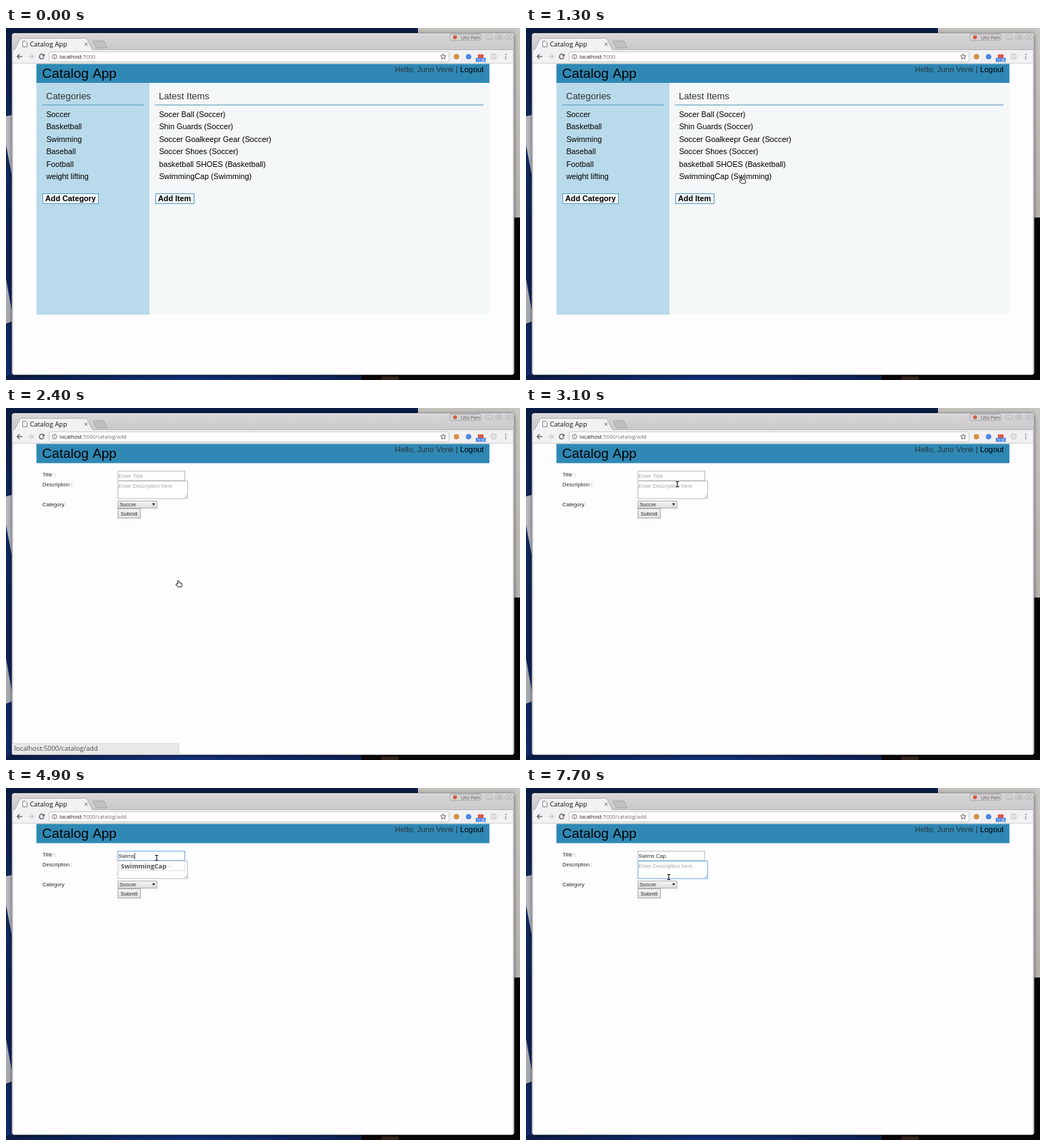
Recreate the animation shown at these times as an HTML page with a canvas. Size 720 by 494 pixels, loop 8000 ms.

```html
<!DOCTYPE html>
<html lang="en">
<head>
<meta charset="utf-8">
<title>Catalog App</title>
<style>
  html, body { margin: 0; width: 100%; height: 100%; overflow: hidden; background: #0c2558; }
  canvas { display: block; width: 720px; height: 494px; }
</style>
</head>
<body>
<canvas id="stage"></canvas>
<script>
const LOOP = 8000, STEP = 100;
const PAGE_FONT = '"Liberation Sans", Arial, sans-serif';
const UI_FONT = '"Open Sans", "Noto Sans", sans-serif';
const canvas = document.getElementById('stage');
const ratio = window.devicePixelRatio || 1;
canvas.width = 720 * ratio;
canvas.height = 494 * ratio;
const ctx = canvas.getContext('2d');
ctx.scale(ratio, ratio);

// ---------- helpers ----------
function rect(x, y, w, h, fill, border) {
  if (fill) { ctx.fillStyle = fill; ctx.fillRect(x, y, w, h); }
  if (border) {
    ctx.strokeStyle = border;
    ctx.lineWidth = 1;
    ctx.strokeRect(x + .5, y + .5, w - 1, h - 1);
  }
}
function roundRect(x, y, w, h, r, fill, border) {
  ctx.beginPath();
  ctx.roundRect(x + .5, y + .5, w - 1, h - 1, r);
  ctx.fillStyle = fill;
  ctx.fill();
  if (border) { ctx.strokeStyle = border; ctx.lineWidth = 1; ctx.stroke(); }
}
function poly(points, fill, stroke, width = 1, close = true) {
  ctx.beginPath();
  points.forEach(([x, y]) => ctx.lineTo(x, y));
  if (close) ctx.closePath();
  if (fill) { ctx.fillStyle = fill; ctx.fill(); }
  if (stroke) { ctx.strokeStyle = stroke; ctx.lineWidth = width; ctx.stroke(); }
}
const line = (x1, y1, x2, y2, color, width = 1) =>
  poly([[x1, y1], [x2, y2]], null, color, width, false);
function circle(x, y, r, fill, stroke, width = 1) {
  ctx.beginPath();
  ctx.arc(x, y, r, 0, 7);
  if (fill) { ctx.fillStyle = fill; ctx.fill(); }
  if (stroke) { ctx.strokeStyle = stroke; ctx.lineWidth = width; ctx.stroke(); }
}
function text(str, x, y, size, color = '#000', { font = PAGE_FONT, weight = 400, align = 'left' } = {}) {
  ctx.font = `${weight} ${size}px ${font}`;
  ctx.textAlign = align;
  ctx.fillStyle = color;
  ctx.fillText(str, x, y);
  return ctx.measureText(str).width;
}
function gradient(x1, y1, x2, y2, ...colors) {
  const g = ctx.createLinearGradient(x1, y1, x2, y2);
  colors.forEach((c, i) => g.addColorStop(i / (colors.length - 1), c));
  return g;
}
function faded(alpha, draw) {
  if (alpha <= 0) return;
  ctx.save();
  ctx.globalAlpha = Math.min(alpha, 1);
  draw();
  ctx.restore();
}
const between = (t, from, to) => t >= from && t < to;

// ---------- desktop and browser ----------
function drawDesktop() {
  rect(0, 0, 720, 494, gradient(0, 0, 0, 494, '#0b1c44', '#10295f', '#0d2050', '#102a6c'));
  poly([[0, 124], [8, 122], [8, 206], [0, 164]], '#b4b7bc');
  poly([[0, 352], [8, 396], [8, 412], [0, 415]], '#a5a9b0');
  rect(0, 487, 500, 7, gradient(0, 0, 500, 0, '#0c1d48', '#12327c', '#0e2253'));
  rect(577, 0, 143, 8, '#c3c1bd');
  rect(711, 0, 9, 268, gradient(0, 0, 0, 268, '#c8c6c2', '#b4b1ac'));
  rect(711, 266, 9, 228, '#050506');
  rect(498, 487, 222, 7, '#0a0808');
  rect(526, 489, 24, 5, '#33221d');
}

function drawWindow() {
  ctx.save();
  ctx.shadowColor = 'rgba(0,0,0,.65)';
  ctx.shadowBlur = 5;
  ctx.shadowOffsetY = 1;
  roundRect(8, 7, 704, 480, 3, '#d4d4d4');
  ctx.restore();
  roundRect(8, 7, 704, 480, 3, gradient(0, 7, 0, 31, '#d8d6d8', '#cac8cb'), '#b0afb0');
  line(10, 8.5, 710, 8.5, '#e9e7e9');

  roundRect(621, 8, 45, 10, 2, '#d3d1d3', '#adabad');
  circle(629, 13, 2.7, '#cf5a40');
  text('Ulo Fen', 637, 16, 7.6, '#555', { font: UI_FONT });
  for (const x of [671, 685, 699]) roundRect(x, 9, 11, 8, 2, '#d2d0d2', '#bab8ba');
  line(674, 14.5, 679, 14.5, '#b4b2b4');
  rect(688, 11, 5, 4, null, '#b4b2b4');
  line(702, 11, 707, 15, '#b4b2b4');
  line(707, 11, 702, 15, '#b4b2b4');

  poly([[122, 18], [137, 18], [142, 28], [127, 28]], '#c1bfc1', '#aaa8aa');
  rect(10, 30, 700, 20, '#f1f0f2');
  line(10, 30.5, 710, 30.5, '#b8b6b8');
  poly([[10, 31], [13, 29], [19, 16], [21, 14.5], [112, 14.5], [114, 16], [120, 29], [123, 31]],
    '#f2f0f2', '#b3b1b3', 1, false);
  rect(10, 31, 114, 2, '#f2f0f2');
  rect(10, 50, 700, 436, '#fdfcfe');
  line(10, 49.5, 710, 49.5, '#d4d3d5');
}

function drawReload(x, y) {
  ctx.beginPath();
  ctx.arc(x, y, 3.2, .3, 5.4);
  ctx.strokeStyle = '#555';
  ctx.lineWidth = 1.2;
  ctx.stroke();
  poly([[x + 4, y - 4], [x + 4, y - .3], [x + .4, y - .3]], '#555');
}

function drawArrow(x, y, dir, color) {
  line(x - 3.5, y, x + 3.5, y, color, 1.2);
  poly([[x + dir * .5, y - 3.3], [x + dir * 3.8, y], [x + dir * .5, y + 3.3]], null, color, 1.2, false);
}

function drawToolbar(t) {
  const ui = { font: UI_FONT };
  const committing = between(t, 2300, 2400);
  if (committing) {
    line(25, 19.5, 28, 19.5, '#bbb');
    text('localhost:5000/c', 33.5, 25.5, 9.3, gradient(33, 0, 105, 0, '#222', '#222', '#222', '#f2f2f2'), ui);
  } else {
    poly([[23.5, 18.5], [27, 18.5], [29.5, 21], [29.5, 26.5], [23.5, 26.5]], '#fff', '#777', .9);
    text('Catalog App', 33.5, 25.5, 9.3, '#111', ui);
  }
  line(110, 20.5, 114.3, 24.8, '#666');
  line(114.3, 20.5, 110, 24.8, '#666');

  drawArrow(19.5, 40, -1, '#555');
  drawArrow(34.5, 40, 1, '#c4c4c4');
  if (between(t, 2100, 2400)) {
    line(46.7, 36.8, 53.1, 43.2, '#555', 1.2);
    line(53.1, 36.8, 46.7, 43.2, '#555', 1.2);
  } else drawReload(50, 40);

  roundRect(60, 33, 561, 15, 2, '#fff', '#cac9ca');
  circle(68, 40.2, 3.2, null, '#666', .9);
  line(68, 39.7, 68, 42, '#666', .9);
  rect(67.5, 38, 1, 1, '#666');
  const hostWidth = text('localhost', 75, 42.8, 7.45, '#111', ui);
  text(t < 2300 ? ':5000' : ':5000/catalog/add', 75 + hostWidth, 42.8, 7.45, '#6c6c6c', ui);

  const star = Array.from({ length: 10 }, (_, i) => {
    const a = i * Math.PI / 5 - Math.PI / 2, r = i % 2 ? 1.8 : 4;
    return [612.5 + r * Math.cos(a), 40.3 + r * Math.sin(a)];
  });
  poly(star, null, '#555', .9);
  circle(631, 40.3, 3.8, '#d68f45');
  circle(648, 40.3, 3.8, '#4a86e2');
  rect(661, 37, 8, 5, '#d9594d');
  rect(658, 42, 14, 5.5, '#4a84e8');
  text('+13K', 665, 46.6, 5, '#fff', { font: UI_FONT, align: 'center' });
  roundRect(679, 36, 8, 8, 1, '#e2e2e2', '#c6c6c6');
  for (const y of [37.3, 40.2, 43.1]) circle(700, y, .8, '#555');
}

// ---------- web page ----------
function drawHeader() {
  rect(42.6, 50.4, 634.6, 27, '#2f88b4');
  text('Catalog App', 50.6, 70.2, 18.95);
  text('Logout', 669.2, 62, 10.85, '#000', { align: 'right' });
  text('Hello, Juno Venk | ', 635.8, 62, 10.95, '#2b3438', { align: 'right' });
}

function linkButton(label, x, w, hover) {
  rect(x, 232, w, 15, hover ? '#e4eef5' : '#f1f5f8', '#5b9fca');
  const color = hover ? '#2b4763' : '#000';
  const width = text(label, x + 4, 243.4, 10.8, color, { weight: 700 });
  if (hover) line(x + 4, 245, x + 4 + width, 245, color);
}

function drawCatalog(t) {
  rect(42.6, 77, 158.4, 325.4, '#b9daeb');
  rect(201, 77, 476.2, 325.4, '#f3f7f8');
  const column = (title, x, lineEnd, items) => {
    text(title, x + 5, 99.6, 13, '#333');
    line(x, 108, lineEnd, 108, '#4e93b9');
    items.forEach((item, i) => text(item, x + 5.4, 125 + i * 17.4, 10.8));
  };
  column('Categories', 51, 193,
    ['Soccer', 'Basketball', 'Swimming', 'Baseball', 'Football', 'weight lifting']);
  column('Latest Items', 209, 669,
    ['Socer Ball (Soccer)', 'Shin Guards (Soccer)', 'Soccer Goalkeepr Gear (Soccer)',
     'Soccer Shoes (Soccer)', 'basketball SHOES (Basketball)', 'SwimmingCap (Swimming)']);
  linkButton('Add Category', 51, 79, false);
  linkButton('Add Item', 209, 55, t >= 1600);
}

const KEYSTROKES = [[3900, 'S'], [4000, 'w'], [4200, 'i'], [4400, 'm'], [4900, 's'],
  [5100, ' '], [5300, 'C'], [5500, 'a'], [5600, 'p']];
const SUGGESTIONS = ['sdfxf', 'Sdf', 'Second Post', 'second post', 'Second post', 'Second Post!'];
const TITLE_FOCUS = 3400, BODY_FOCUS = 5800;

function caret(x, y, t, since) {
  if ((t - since) % 1000 < 500) rect(x, y, .8, 9, '#222');
}

function drawForm(t) {
  const label = (str, x, y, color = '#2c2c2c') => text(str, x, y, 7.6, color);
  const typed = KEYSTROKES.filter(([at]) => t >= at);
  const title = typed.map(([, key]) => key).join('');
  const inTitle = between(t, TITLE_FOCUS, BODY_FOCUS), inBody = t >= BODY_FOCUS;
  const border = focused => focused ? '#6ba7e2' : '#bcbcbc';

  label('Title :', 51, 96.3);
  label('Description :', 51, 110.3);
  label('Category', 51, 138);

  rect(156.3, 88.2, 94.7, 14, '#fff', border(inTitle));
  label(title || 'Enter Title', 157.5, 98, title ? '#2c2c2c' : '#a5a5a5');
  if (inTitle) {
    const lastKey = typed.length ? typed[typed.length - 1][0] : TITLE_FOCUS;
    caret(157.5 + ctx.measureText(title).width, 91, t, lastKey);
  }

  rect(156.3, 102.2, 98.5, 25.4, '#fff', border(inBody));
  label('Enter Description here', 157.5, 112.3, '#a5a5a5');
  line(250, 126, 254, 122, '#999', .7);
  line(252, 126, 254, 124, '#999', .7);
  if (inBody) caret(157, 105, t, 5900);

  rect(156.3, 130, 55.5, 11, gradient(0, 130, 0, 141, '#f6f6f6', '#dcdcdc'), '#b0b0b0');
  label('Soccer', 159, 138);
  poly([[204.8, 133.8], [208.8, 133.8], [206.8, 137.2]], '#222');
  rect(156.3, 141, 32.5, 14, gradient(0, 141, 0, 155, '#f6f6f6', '#dcdcdc'), '#b0b0b0');
  label('Submit', 160.5, 150.5);

  if (between(t, 3900, 5100)) {
    const rows = t < 4000 ? SUGGESTIONS : ['SwimmingCap'];
    faded(t < 4900 ? 1 : t < 5000 ? .65 : .2, () => {
      rect(156, 102, 95, rows.length * 13 + 1.5, '#fff', '#d0d0d0');
      rows.forEach((row, i) =>
        text(row, 161, 112.6 + i * 13, 9, '#000', { font: UI_FONT, weight: 700 }));
    });
  }
}

function drawStatus(t) {
  const alpha = t < 2600 ? (t - 1800) / 100 : 1 - (t - 2500) / 200;
  faded(alpha, () => {
    ctx.beginPath();
    ctx.roundRect(9, 471, 233, 15, [0, 2, 0, 0]);
    ctx.fillStyle = '#e9e9e9';
    ctx.fill();
    ctx.strokeStyle = '#d4d4d4';
    ctx.lineWidth = 1;
    ctx.stroke();
    text('localhost:5000/catalog/add', 11.5, 481.2, 9.3, '#4a4a4a', { font: UI_FONT });
  });
}

// ---------- pointer ----------
const PATH = [[800, 730, -12], [900, 676, 6], [1000, 655, 22], [1100, 560, 76], [1200, 420, 150],
  [1300, 302, 209], [1400, 262, 231], [1600, 241, 242], [2500, 241, 242], [2800, 222, 165],
  [3100, 212, 107], [3400, 211, 98], [6900, 211, 98], [7100, 217, 119], [7300, 241, 122],
  [7500, 215, 125], [7700, 200, 125]];

function pointerAt(t) {
  const next = PATH.findIndex(([at]) => at > t);
  if (next < 0) return PATH[PATH.length - 1].slice(1);
  const [t0, x0, y0] = PATH[next - 1], [t1, x1, y1] = PATH[next];
  const k = (t - t0) / (t1 - t0);
  return [x0 + (x1 - x0) * k, y0 + (y1 - y0) * k];
}

function drawPointer(t) {
  if (t < 800) return;
  const [x, y] = pointerAt(t);
  ctx.save();
  ctx.translate(x, y);
  ctx.lineJoin = 'round';
  const overField = t > 2500 && x > 156 && x < 255 && y < 128;
  if (overField) {
    line(0, -3.5, 0, 3.5, '#222', 1.2);
    for (const end of [-3.5, 3.5]) line(-2.2, end, 2.2, end, '#222', 1.1);
  } else if (t === 1300 || between(t, 1600, 2300) || t === 2400) {
    poly([[-1, 1], [1, .5], [2, 3.5], [5, 4], [5.5, 5.5], [5, 9], [-.5, 9], [-3, 6], [-2.5, 4.8], [0, 5]],
      '#fff', '#222');
  } else {
    poly([[0, 0], [0, 9], [2, 7.2], [3.5, 10.2], [5, 9.5], [3.7, 6.6], [6.3, 6.4]], '#fff', '#222');
  }
  ctx.restore();
}

function render(t) {
  drawDesktop();
  drawWindow();
  drawToolbar(t);
  drawHeader();
  if (t < 2400) drawCatalog(t);
  else drawForm(t);
  drawStatus(t);
  drawPointer(t);
}

function frame() {
  const t = performance.now() % LOOP;
  render(Math.floor(t / STEP) * STEP);
  requestAnimationFrame(frame);
}
frame();
</script>
</body>
</html>
```
